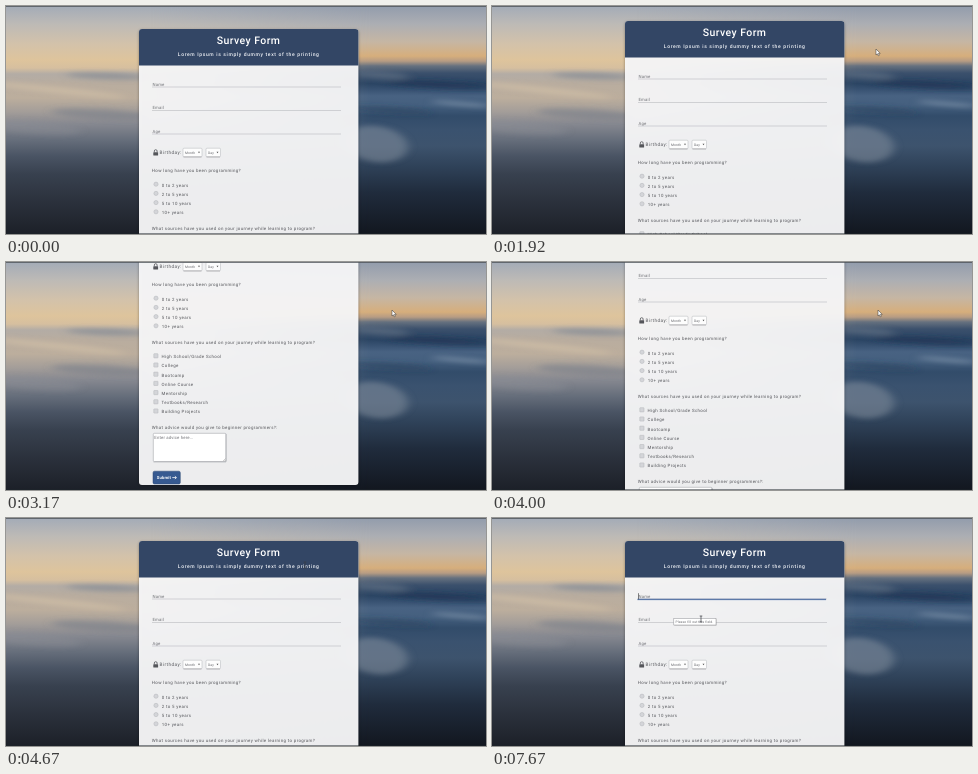
Write an HTML page that moves like this. It is 480 px wide and 228 px high and loops after 8 s.

```html
<!DOCTYPE html>
<html lang="en">
<head>
<meta charset="utf-8">
<title>Survey Form</title>
<style>
  html, body { margin: 0; width: 100%; height: 100%; overflow: hidden; background: #1b2430; }
  #stage { position: absolute; inset: 0; overflow: hidden; }
  #stage > * { position: absolute; inset: 0; }
  .left { background: linear-gradient(#a3abb7 0, #bdbab6 18px, #d3c2aa 38px, #dec49c 54px, #d6bf9f 62px,
    #b3aca5 68px, #b9ad9f 78px, #bcae9d 92px, #a39d99 106px, #868890 118px, #666e7b 134px, #4a5464 150px, #38414f 168px, #2b313c 196px, #1c2028 228px); }
  .right { background: linear-gradient(#929cac 0, #acaeb3 18px, #c6b6a3 36px, #d6ae7c 50px, #b79c83 55px, #66717f 60px,
    #3b506c 67px, #2b4564 78px, #486282 90px, #45607f 99px, #324c6a 110px, #3a526f 124px, #3d536d 140px, #2f4259 160px, #202c3d 186px, #12171f 228px);
    -webkit-mask-image: linear-gradient(90deg, transparent 30%, #000 76%);
    mask-image: linear-gradient(90deg, transparent 30%, #000 76%); }
  svg { display: block; width: 480px; height: 228px; }
  text { font-family: Roboto, Arial, sans-serif; font-size: 4.4px; letter-spacing: .35px; fill: #55565b;
    text-rendering: geometricPrecision; white-space: pre; }
  .title { font-size: 10.5px; font-weight: 500; letter-spacing: .42px; fill: #fff; }
  .sub { font-size: 5px; font-weight: 500; letter-spacing: .64px; fill: #f4f6fa; }
  .hint { font-size: 4.3px; letter-spacing: .15px; fill: #707176; }
  .tiny { font-size: 3.4px; letter-spacing: .1px; fill: #66676c; }
  .date { font-size: 4.7px; letter-spacing: .42px; }
  .send { font-weight: 700; font-size: 4.2px; letter-spacing: .15px; fill: #fff; }
</style>
</head>
<body>
<div id="stage">
  <div class="left"></div>
  <div class="right"></div>
  <svg viewBox="0 0 480 228">
    <defs>
      <filter id="soft" x="-10%" y="-10%" width="120%" height="120%"><feGaussianBlur stdDeviation="1.6"/></filter>
      <filter id="haze" x="-50%" y="-150%" width="200%" height="400%"><feGaussianBlur stdDeviation="5 2.5"/></filter>
    </defs>
    <g id="waves" filter="url(#haze)"></g>
    <g id="page"></g>
    <g id="arrow"><path d="M0 0V6L1.4 4.8 2.3 6.8 3.3 6.3 2.4 4.4H4.2Z" fill="#fff" stroke="#333" stroke-width=".5"/></g>
    <g id="beam"><path d="M-1.3 -3H1.3M0 -3V3M-1.3 3H1.3" fill="none" stroke="#3c3e42" stroke-width=".7"/></g>
    <path d="M0 .5H480" stroke="#4b5056" stroke-opacity=".75"/>
    <path d="M0 227.6H480" stroke="#20262e" stroke-opacity=".7" stroke-width=".8"/>
  </svg>
</div>
<script>
const LOOP = 8000, RATE = 12;               // tables below count ticks, 12 per second
const SCROLL = [[22, 0], [23, 8], [25, 52], [27, 99], [28, 107], [32, 108], [33, 112], [35, 132], [38, 142],
  [44, 142], [45, 138], [48, 88], [50, 45], [52, 12], [54, 0]];
const POINTER = [[16, 372, -8], [17, 378, 20], [19, 382, 36], [23, 384, 43], [27, 386, 48], [54, 386, 48],
  [55, 350, 48], [56, 299, 47], [58, 262, 60], [62, 205, 78], [69, 205, 78], [70, 206, 83], [74, 209, 101]];
const FOCUS = 65, TIP = 80, BLINK = 6;

const $ = id => document.getElementById(id);
const page = $('page');

function add(tag, attrs, label, parent = page) {
  const el = document.createElementNS('http://www.w3.org/2000/svg', tag);
  for (const k in attrs) el.setAttribute(k, attrs[k]);
  if (label) el.textContent = label;
  return parent.appendChild(el);
}
const box = (x, y, width, height, fill, more) => add('rect', { x, y, width, height, fill, ...more });
const text = (x, mid, label, cls = '', more) => add('text', { x, y: mid + 1.6, class: cls, ...more }, label);
const path = (d, stroke, width, more) => add('path', { d, stroke, 'stroke-width': width, fill: 'none', ...more });

function wave(cx, cy, rx, ry, tilt, fill, opacity) {
  add('ellipse', { cx, cy, rx, ry, fill, opacity, transform: `rotate(${tilt} ${cx} ${cy})` }, '', $('waves'));
}

function select(x, w, label) {
  box(x, 142.2, w, 8.6, '#fdfdfd', { rx: 1, stroke: '#b3b4b8', 'stroke-width': .5 });
  path(`M${x + .5} 151H${x + w - .5}`, '#97989d', .6);
  text(x + 2, 146.2, label, 'tiny');
  add('path', { d: `M${x + w - 4} 145.7h2l-1 1.5z`, fill: '#555' });
}

function build() {
  wave(100, 70, 40, 3, 2, '#79828f', .6);
  wave(50, 84, 70, 3, 6, '#dcc8ab', .5);
  wave(95, 108, 50, 5, 3, '#747b87', .5);
  wave(30, 122, 45, 6, 4, '#8d8f96', .4);
  wave(375, 69, 28, 4, 4, '#6d7a8b', .5);
  wave(435, 79, 55, 4, 3, '#1c3554', .6);
  wave(455, 98, 30, 1.5, 5, '#9fb0c2', .6);
  wave(385, 104, 40, 3, 4, '#28415f', .5);
  wave(370, 138, 32, 18, 8, '#8a93a1', .5);

  box(133, 24, 219.4, 341, '#000', { rx: 3, opacity: .35, filter: 'url(#soft)' });
  box(133, 23, 219.4, 342, '#f9f9fa', { rx: 3, 'fill-opacity': .95 });
  add('path', { d: 'M133 59.4V26a3 3 0 0 1 3-3H349.4a3 3 0 0 1 3 3V59.4Z', fill: '#334665' });
  const centre = { 'text-anchor': 'middle' };
  text(242.6, 36.3, 'Survey Form', 'title', centre);
  text(242.7, 48.2, 'Lorem Ipsum is simply dummy text of the printing', 'sub', centre);

  ['Name', 'Email', 'Age'].forEach((label, i) => {
    const y = 78 + i * 23.5;
    text(146.5, y, label, 'hint');
    path(`M146 ${y + 3}H335`, '#b9bac0', .6);
  });

  box(147.3, 146.2, 4.8, 3.3, '#55565b', { rx: .5 });
  path('M148.3 146.4v-1.4q0-1.3 1.4-1.3t1.4 1.3v1.4', '#55565b', .8);
  text(153.5, 146.4, 'Birthday:', 'date');
  select(177, 19, 'Month');
  select(200, 14.5, 'Day');

  text(145.8, 164.6, 'How long have you been programming?');
  ['0 to 2 years', '2 to 5 years', '5 to 10 years', '10+ years'].forEach((label, i) => {
    const y = 179 + i * 9.2;
    add('circle', { cx: 150, cy: y - .8, r: 2.1, fill: '#d4d5d9', stroke: '#b3b4b9', 'stroke-width': .5 });
    text(155.8, y, label);
  });

  text(145.8, 222.3, 'What sources have you used on your journey while learning to program?');
  ['High School/Grade School', 'College', 'Bootcamp', 'Online Course', 'Mentorship',
    'Textbooks/Research', 'Building Projects'].forEach((label, i) => {
    const y = 236.5 + i * 9.2;
    box(147.8, y - 2.8, 4.2, 4.2, '#d4d5d9', { rx: .4, stroke: '#b3b4b9', 'stroke-width': .5 });
    text(155.6, y, label);
  });

  text(145.8, 307.6, 'What advice would you give to beginner programmers?:');
  box(147.3, 313.3, 72.7, 28.2, '#fff', { rx: 1, stroke: '#a5a6ab', 'stroke-width': .6 });
  path('M147.5 342H220V314', '#97989d', .5);
  path('M217 341l2.5-2.5M218.4 341l1.1-1.1', '#888', .4);
  text(148.3, 317, 'Enter advice here...', 'hint');

  box(147, 351.2, 27.3, 12.8, '#375a91', { rx: 1.5, stroke: '#2c4770', 'stroke-width': .5 });
  text(150.8, 357.6, 'Submit', 'send');
  path('M166.3 357.6h4M168.9 356.2l1.5 1.4-1.5 1.4', '#fff', .8);
}

build();
const glow = path('M145.5 81.6H334', '#6d8fc4', 1.8, { opacity: .3 });
const line = path('M145.5 81.3H334', '#45669c', 1);
const caret = path('M146.5 75.2V81.3', '#333', .6);
const tip = [
  box(182.3, 101.2, 42.2, 6.4, '#777', { opacity: .4 }),
  box(181.8, 100.6, 42.2, 6.4, '#fff', { stroke: '#929397', 'stroke-width': .5 }),
  text(183.5, 103.6, 'Please fill out this field.', 'tiny')
];

function sample(table, n) {
  let i = 0;
  while (i < table.length - 1 && table[i + 1][0] <= n) i++;
  const a = table[i], b = table[i + 1] || a;
  const p = b === a ? 0 : Math.max(0, (n - a[0]) / (b[0] - a[0]));
  return a.slice(1).map((v, k) => v + (b[k + 1] - v) * p);
}
const show = (el, on) => el.setAttribute('visibility', on ? 'visible' : 'hidden');

function draw(ms) {
  const n = Math.floor((ms % LOOP + 4) * RATE / 1000);
  page.setAttribute('transform', `translate(0 ${-sample(SCROLL, n)[0]})`);

  const [x, y] = sample(POINTER, n);
  const onText = x < 315 && (Math.abs(y - 48) < 4 || y > 74);
  for (const id of ['arrow', 'beam']) $(id).setAttribute('transform', `translate(${x} ${y})`);
  show($('arrow'), n >= 16 && !onText);
  show($('beam'), onText);

  const focused = n >= FOCUS;
  show(line, focused);
  show(glow, focused);
  show(caret, focused && Math.floor((n - FOCUS) / BLINK) % 2 === 0);
  tip.forEach(el => show(el, n >= TIP));
}

const start = performance.now();
function frame() {
  draw(performance.now() - start);
  requestAnimationFrame(frame);
}
frame();
</script>
</body>
</html>
```
